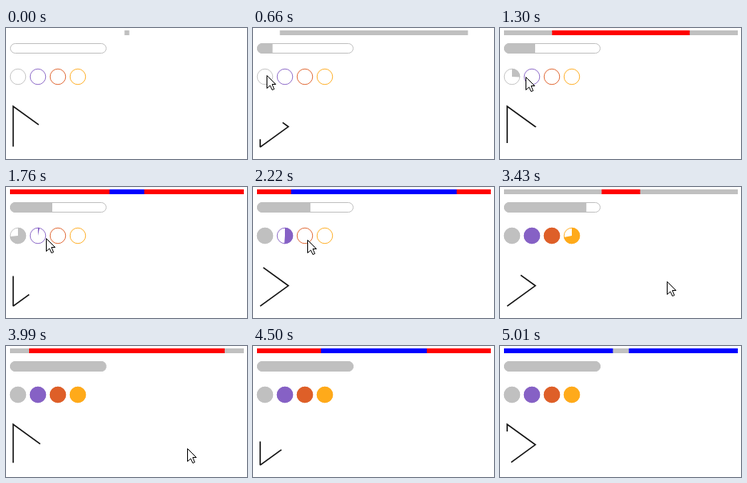
Write an HTML page that moves like this. It is 302 px wide and 164 px high and loops after 5060 ms.

```html
<!DOCTYPE html>
<html lang="en">
<head>
<meta charset="utf-8">
<title>Progress indicators</title>
<style>
  html, body { margin: 0; width: 100%; height: 100%; overflow: hidden; background: #fff; }
  svg { display: block; width: 100%; height: 100%; }
</style>
</head>
<body>
<svg viewBox="0 0 302 164">
  <defs>
    <clipPath id="pill"><rect x="5" y="19" width="121" height="13" rx="6.5"/></clipPath>
  </defs>
  <rect id="track" x="5" y="3" width="293" height="6"/>
  <rect id="bar" y="3" height="6"/>
  <rect id="fill" x="5" y="19" height="13" fill="#c0c0c0" clip-path="url(#pill)"/>
  <rect x="5.5" y="19.5" width="120" height="12" rx="6" fill="none" stroke="#c0c0c0"/>
  <g id="dials" fill="none"></g>
  <path id="dash" d="M9 149.2V98L44.3 123.6L9 149.2" fill="none" stroke="#111" stroke-width="1.6" stroke-dasharray="90 76"/>
  <path id="cursor" d="M.5 .5V16.5L4.5 13L7 18.5L9.5 17.5L7 11.5H11.5Z" fill="#fff" stroke="#000"/>
</svg>
<script>
const LOOP = 5060, STEP = 46.42, STEPS = 109;
const BAR_COLORS = ['#c0c0c0', '#f00', '#00f'];
const DIAL_TIME = 21.5;
const dials = [
  { color: '#c0c0c0', start: 22.6 },
  { color: '#8661c5', start: 37.25 },
  { color: '#de5f28', start: 48.55 },
  { color: '#ffaa1a', start: 59 }
];
// The pointer enters, rests, crosses the dials, jumps away and leaves.
const pointer = [
  { at: 11, x: 2, y: 59 },
  { at: 14, x: 17, y: 59 },
  { at: 20, x: 17, y: 59 },
  { at: 60, x: 90, y: 69 },
  { at: 62, x: 190, y: 108 },
  { at: 86, x: 227, y: 128 },
  { at: 94, x: 234, y: 162 }
];

const $ = id => document.getElementById(id);
const clamp = v => Math.max(0, Math.min(1, v));

function set(el, attrs) {
  for (const name in attrs) el.setAttribute(name, attrs[name]);
  return el;
}

function addCircle(x, attrs) {
  const el = document.createElementNS('http://www.w3.org/2000/svg', 'circle');
  $('dials').append(set(el, { cx: x, cy: 61, ...attrs }));
  return el;
}

dials.forEach((dial, n) => {
  const x = 15 + 25 * n, stroke = dial.color;
  addCircle(x, { r: 9.75, stroke, 'stroke-width': .9 });
  dial.wedge = addCircle(x, { r: 5.1, stroke, 'stroke-width': 10.2, transform: `rotate(-90 ${x} 61)` });
});

function drawBar(step) {
  const sweep = .0205 + .056 * step;
  const turn = Math.floor(sweep), width = 293 * (sweep - turn);
  set($('track'), { fill: turn ? BAR_COLORS[(turn - 1) % 3] : 'none' });
  set($('bar'), { x: 151.5 - width / 2, width, fill: BAR_COLORS[turn % 3] });
}

function drawDial({ wedge, start }, step) {
  const part = clamp((step - start) / DIAL_TIME);
  const length = 2 * Math.PI * 5.1;
  set(wedge, {
    visibility: part ? 'visible' : 'hidden',
    'stroke-dasharray': part < 1 ? `${part * length} ${length}` : 'none'
  });
}

function drawCursor(step) {
  const next = pointer.findIndex(p => p.at > step);
  const visible = next > 0;
  set($('cursor'), { visibility: visible ? 'visible' : 'hidden' });
  if (!visible) return;
  const a = pointer[next - 1], b = pointer[next];
  const mix = key => Math.round(a[key] + (b[key] - a[key]) * (step - a.at) / (b.at - a.at));
  set($('cursor'), { transform: `translate(${mix('x')} ${mix('y')})` });
}

function draw(step) {
  drawBar(step);
  set($('fill'), { width: Math.min(121, step * 1.395) });
  dials.forEach(dial => drawDial(dial, step));
  set($('dash'), { 'stroke-dashoffset': 5.764 * step - .7 });
  drawCursor(step);
}

const begin = performance.now();
function tick() {
  const time = (performance.now() - begin) % LOOP;
  draw(Math.min(STEPS - 1, Math.floor((time + 10) / STEP)));
  requestAnimationFrame(tick);
}
tick();
</script>
</body>
</html>
```
